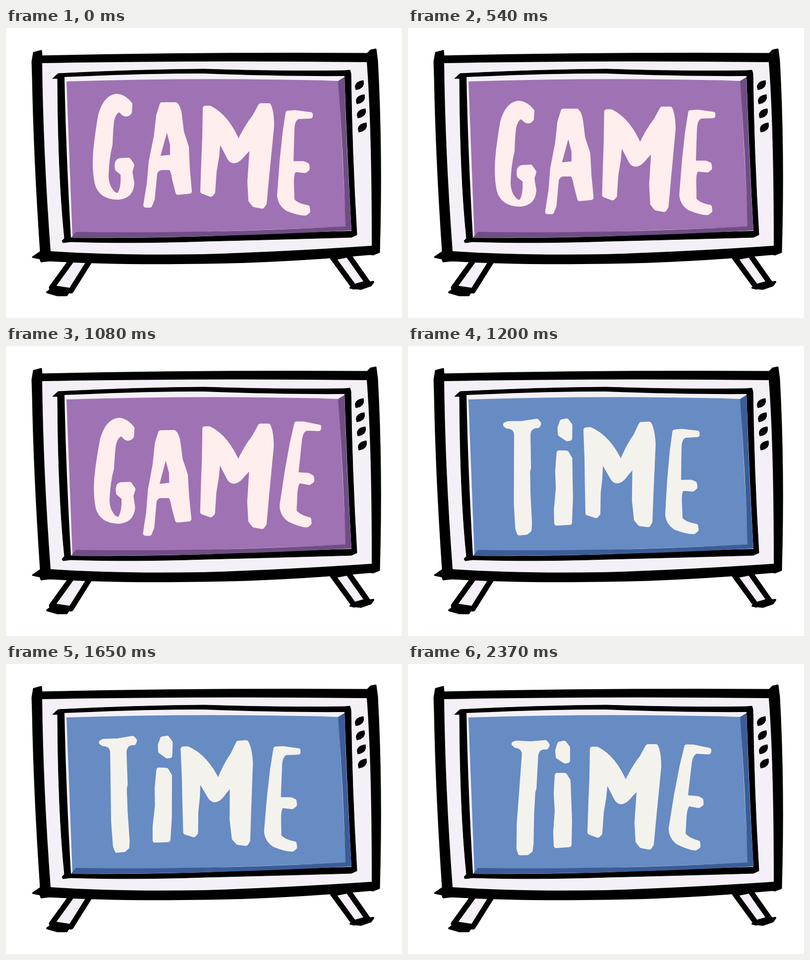
An HTML page with a canvas for the animation above (2430 ms loop, 799 px wide and 586 px high).

```html
<!DOCTYPE html>
<html lang="en">
<head>
<meta charset="utf-8">
<title>Game time</title>
<style>
  html, body { margin: 0; width: 100%; height: 100%; overflow: hidden; background: #fff; }
  canvas { display: block; }
</style>
</head>
<body>
<canvas id="stage" width="799" height="586"></canvas>
<script>
const ctx = document.getElementById('stage').getContext('2d');
const LOOP = 2430, SWITCH = 1200, STEP = 90;
const INK = '#000', CASE = '#f5f0f7';
const BASELINE = 405, BRUSH = 10;

// Brush letters: a thin outline, thickened by a round stroke of BRUSH width.
const glyph = (pivot, d) => ({ pivot, path: new Path2D(d) });

const G = glyph(218, 'M231 165Q241 180 249 170L250 154Q237 138 222 138Q201 141 191 176Q180 240 180 272' +
  'Q180 295 184 314Q192 342 226 342Q252 340 254 314L250 290L254 277L247 267L230 268Q222 270 225 285' +
  'L236 294Q238 325 228 338Q218 340 210 327Q203 318 202 300Q203 262 210 235Q211 205 213 188' +
  'Q218 165 231 165Z');
const A = glyph(325, 'M315 155H342Q348 160 350 176L354 210L364 241L366 285L370 330L347 332L340 304' +
  'Q337 283 330 282H313Q302 284 300 295L295 346L290 358H282L289 315L293 270L303 220L308 177Z' +
  'M325 192L305 264L336 261V236Z');
const M = glyph(466, 'M402 162H411Q447 180 469 235Q485 200 502 179L514 157H530Q536 170 536 198L526 300' +
  'L521 354L517 360L501 357L494 348L492 310L497 236L480 253Q461 278 451 262L429 219L425 260L420 290' +
  'L417 332L413 336L397 330L399 270L401 220Z');
const E = glyph(584, 'M569 172L583 171L614 175V178L590 179Q578 182 577 205L575 274H600L607 277L608 284' +
  'L603 288L583 286Q576 290 576 312L577 348Q585 359 608 363L609 370L604 374Q590 374 568 365' +
  'Q553 355 552 338L557 270L563 212Z');
const T = glyph(236, 'M206 158H235L264 154L268 159L266 163Q248 162 246 181V247L244 255V300L246 360' +
  'L245 373L239 378L225 379L222 370L220 320L223 180Q222 164 205 163L201 160Z');
const I = glyph(312, 'M306 155L315 153L322 162V188L317 189L303 180L302 168Z' +
  'M301 218H316L323 229L326 310L325 358L299 360L298 332L301 290L299 255Z');

// Every letter has a sideways shift and a [drop, tilt] pose at each key time.
const game = {
  start: 0, keys: [0, 540, 720, 1080], screen: '#9f72b3', bevel: '#704e85', text: '#ffeeed',
  letters: [
    [G, 0, [[0, 0], [14, 0], [8, -4], [12, 1]]],
    [A, 0, [[0, 0], [13, -.4], [1, 0], [20, -.7]]],
    [M, 0, [[0, 0], [7, -.3], [7, -3.8], [5, -.2]]],
    [E, 0, [[0, 0], [-1, .3], [-7, 4], [-14, 4.3]]]
  ]
};
const time = {
  start: SWITCH, keys: [1380, 1920, 2370], screen: '#678bc3', bevel: '#3a5d98', text: '#f4f2ed',
  letters: [
    [T, 0, [[0, 0], [-6, -4], [3, 3]]],
    [I, 0, [[0, 0], [-7, 4.5], [7, 0]]],
    [M, -30, [[2, -2.7], [9, -4.3], [10, 0]]],
    [E, -27, [[3, -2.4], [-3, 3.6], [-4, 5]]]
  ]
};

// Fill a path, optionally with a round-jointed outline.
function shape(d, color, width = 0, line = color) {
  const path = typeof d === 'string' ? new Path2D(d) : d;
  ctx.fillStyle = color;
  ctx.fill(path, 'evenodd');
  if (!width) return;
  ctx.strokeStyle = line;
  ctx.lineWidth = width;
  ctx.stroke(path);
}

function drawLegs() {
  shape('M136 464H173L131 531L92 525Z', CASE, 11, INK);
  shape('M83 534L98 523L129 530L122 540H104Z', INK, 4);
  shape('M659 464L690 458L730 515L702 523Z', CASE, 11, INK);
  shape('M695 525L708 518L741 513L736 520L716 527Z', INK, 4);
}

function drawSet(word) {
  shape('M56 50L71 46L72 57Q400 50 729 52L736 45L746 43L749 66Q759 250 753 453L740 458L736 457' +
    'Q560 473 400 475Q220 478 88 470L71 472L69 466L54 463L70 452Q57 260 54 100L53 68Z', INK, 3);
  shape('M73 71Q400 65 728 69Q738 200 738 440Q560 452 400 457Q220 460 90 451Q75 250 73 71Z', CASE);
  shape('M94 102L105 92Q260 84 400 83Q560 88 683 86L694 85L696 92Q698 250 708 418L697 423' +
    'Q560 427 400 431Q250 436 131 432L115 434L113 430L118 425Q105 300 104 102Z', INK, 1);
  shape('M118 99Q300 91 400 92Q560 98 683 97Q688 250 697 410Q560 414 400 421Q250 425 131 424' +
    'Q121 250 118 99Z', CASE);
  shape('M122 108Q400 99 671 107L686 402L134 421Z', word.screen);
  shape('M670 107L683 99Q687 250 697 409Q400 425 131 424L141 412Q400 416 685 401Q681 260 670 107Z', word.bevel);
  for (let i = 0; i < 4; i++) {
    const x = 713 + 2 * i, y = 116 + 28.5 * i;
    shape(`M${x - 7} ${y + 9}Q${x - 13} ${y - 7} ${x + 8} ${y - 10}Q${x + 12} ${y + 6} ${x - 7} ${y + 9}Z`, INK, 1);
  }
}

// Swing from key to key; outside the keys the swing turns back.
function poseAt(keys, poses, t) {
  let k = 0;
  while (k < keys.length - 2 && t >= keys[k + 1]) k++;
  const u = (t - keys[k]) / (keys[k + 1] - keys[k]);
  const ease = (1 - Math.cos(Math.PI * u)) / 2;
  return poses[k].map((a, i) => a + (poses[k + 1][i] - a) * ease);
}

function draw(now) {
  const t = now % LOOP;
  const word = t < SWITCH ? game : time;
  const held = word.start + Math.floor((t - word.start) / STEP) * STEP;

  ctx.fillStyle = '#fff';
  ctx.fillRect(0, 0, 799, 586);
  ctx.lineJoin = 'round';
  drawLegs();
  drawSet(word);
  for (const [letter, shift, poses] of word.letters) {
    const [drop, tilt] = poseAt(word.keys, poses, held);
    ctx.save();
    ctx.translate(letter.pivot + shift, BASELINE + drop);
    ctx.rotate(tilt * Math.PI / 180);
    ctx.translate(-letter.pivot, -BASELINE);
    shape(letter.path, word.text, BRUSH);
    ctx.restore();
  }
}

const began = performance.now();
function tick() {
  draw(performance.now() - began);
  requestAnimationFrame(tick);
}
tick();
</script>
</body>
</html>
```
